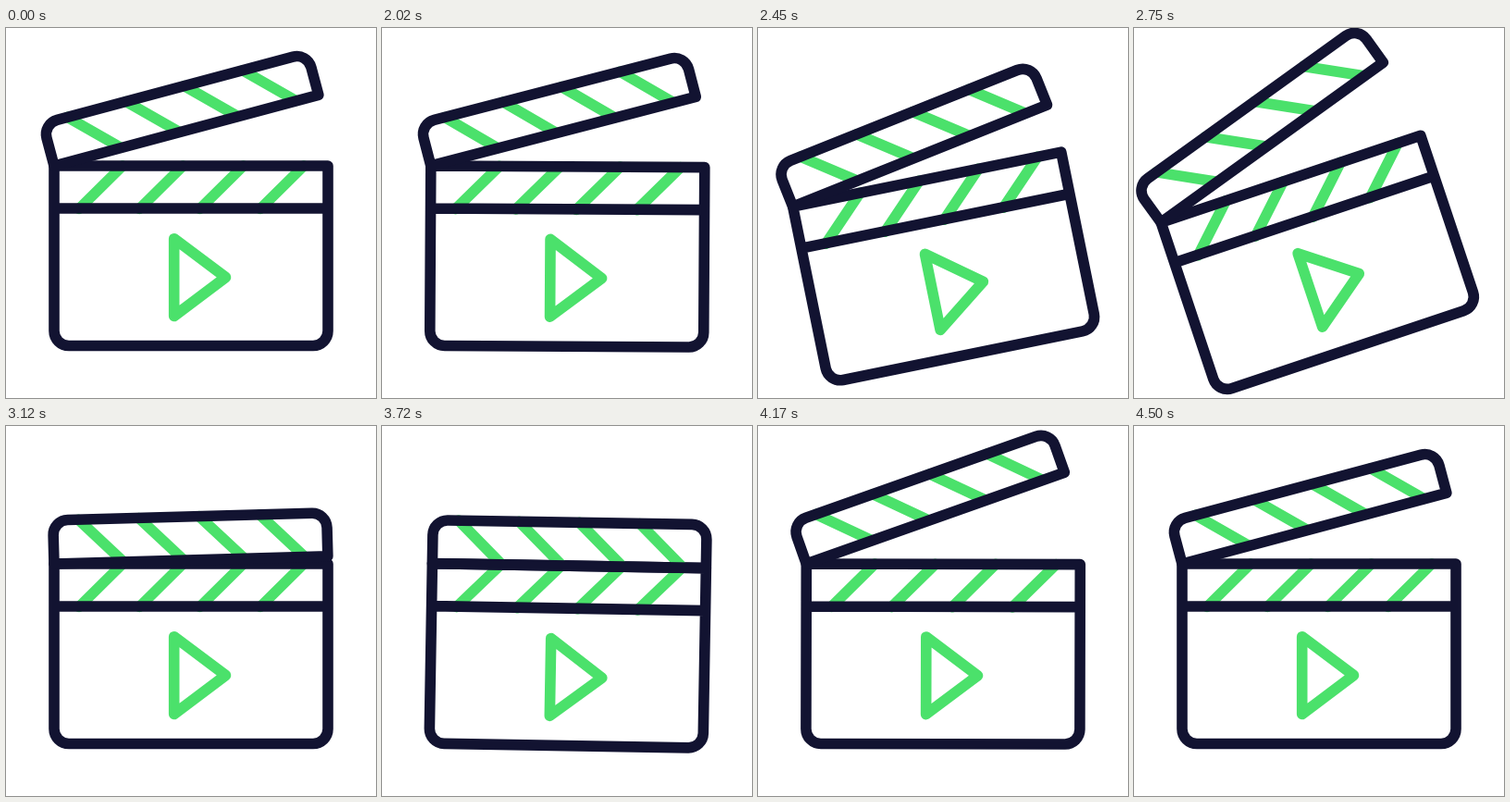
These frames come from a looping animation (400 by 400 pixels, 4.52 s). An HTML page:

```html
<!DOCTYPE html>
<html lang="en">
<head>
<meta charset="utf-8">
<title>Clapperboard</title>
<style>
  html, body { margin: 0; width: 100%; height: 100%; overflow: hidden; background: #fff; }
  svg { display: block; width: 100%; height: 100%; }
  path { fill: none; stroke-width: 11.6; stroke-linejoin: round; stroke-linecap: round; }
  .ink { stroke: #121331; }
  .green { stroke: #4be16b; }
</style>
</head>
<body>
<svg viewBox="0 0 400 400">
  <g id="board">
    <path class="green" id="lower"/>
    <path class="ink" d="M52 149H348V327.5a16 16 0 0 1-16 16H68a16 16 0 0 1-16-16ZM52 195H348"/>
    <path class="green" d="M181.7 227.7L237.5 269.5L181.7 311.5Z"/>
    <g id="clap">
      <path class="green" id="upper"/>
      <path class="ink" d="M52 149H348V118a16 16 0 0 0-16-16H68a16 16 0 0 0-16 16Z"/>
    </g>
  </g>
</svg>
<script>
const LOOP = 4520;
const $ = id => document.getElementById(id);

// Four diagonal stripes, 65.3 apart.
const stripes = (x, y, dx) =>
  [0, 1, 2, 3].map(i => `M${x + i * 65.3} ${y}l${dx} 46.5`).join('');
$('lower').setAttribute('d', stripes(126, 149, -47));
$('upper').setAttribute('d', stripes(79.7, 102, 47));

// Smooth step from 0 to 1 between two times.
const ease = (t, from, to) =>
  (1 - Math.cos(Math.PI * Math.min(1, Math.max(0, (t - from) / (to - from))))) / 2;

function boardPose(t) {
  const lean = ease(t, 1992, 2208) - ease(t, 2208, 2600);
  const back = ease(t, 2208, 2600) - ease(t, 2675, 3070);
  const nod = ease(t, 3650, 3955) - ease(t, 3955, 4190);
  const x = 5.5 * lean + back + 5.4 * nod;
  const y = 18.2 * lean + 10 * back + 16.8 * nod;
  const tilt = 7.6 * (lean + nod) - 20.3 * back;
  return `translate(${x} ${y}) rotate(${tilt} 200 248)`;
}

function clapPose(t) {
  const windUp = 11.9 * ease(t, 2010, 2200) - 14.3 * ease(t, 2200, 2700);
  const snap = 24.4 * ease(t, 2735, 3050);
  const bounce = 4 * ease(t, 3153, 3370) - 11 * ease(t, 3050, 3153);
  const open = 5 * ease(t, 4190, 4500) - 20 * ease(t, 3982, 4190);
  return `rotate(${-15 + windUp + snap + bounce + open} 52 149)`;
}

function draw() {
  const t = performance.now() % LOOP;
  $('board').setAttribute('transform', boardPose(t));
  $('clap').setAttribute('transform', clapPose(t));
  requestAnimationFrame(draw);
}
draw();
</script>
</body>
</html>
```
